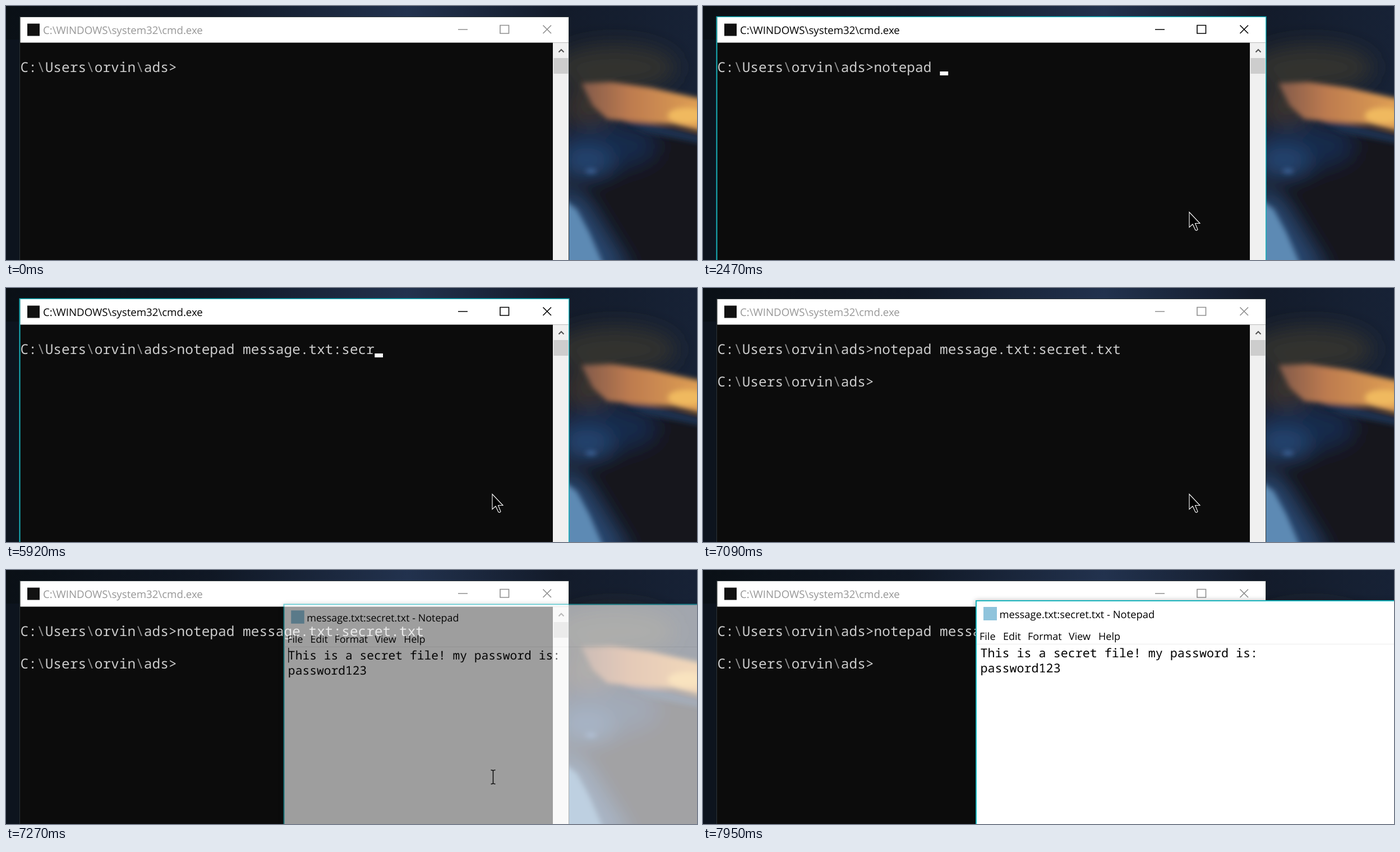
An HTML page for the animation above (8000 ms loop, 1232 by 454 pixels).

```html
<!DOCTYPE html>
<html lang="en">
<head>
<meta charset="utf-8">
<title>Terminal</title>
<style>
html, body { margin: 0; width: 100%; height: 100%; overflow: hidden; background: #0b1119; }
svg { display: block; }
text { white-space: pre; text-rendering: geometricPrecision; }
.ui { font-family: "Open Sans", "Noto Sans", sans-serif; }
.mono { font-family: "Noto Sans Mono", "DejaVu Sans Mono", monospace; }
.term { font-size: 24.47px; fill: #ccc; }
.slash { fill: #8c8c8c; font-weight: 200; }
.menu { font-size: 18px; }
.body { font-size: 21.7px; }
.frame { stroke: #2c3538; }
.title { fill: #969696; font-size: 18.66px; }
.buttons { stroke: #8e8e8e; stroke-width: 1.6; fill: none; }
.active .frame { stroke: #18b4bd; stroke-width: 2; }
.active .title { fill: #000; }
.active .buttons { stroke: #000; }
#paper { filter: drop-shadow(0 1px 5px rgba(0, 0, 0, .35)); }
</style>
</head>
<body>
<svg width="1232" height="454" viewBox="0 0 1232 454">
  <defs>
    <linearGradient id="sky">
      <stop offset="0" stop-color="#0a1016"/>
      <stop offset=".3" stop-color="#101825"/>
      <stop offset=".58" stop-color="#22324e"/>
      <stop offset=".8" stop-color="#131b2a"/>
      <stop offset="1" stop-color="#172236"/>
    </linearGradient>
    <linearGradient id="glow">
      <stop offset="0" stop-color="#80594a"/>
      <stop offset=".4" stop-color="#bd7b50"/>
      <stop offset="1" stop-color="#e0a052"/>
    </linearGradient>
    <filter id="soft" x="-50%" y="-50%" width="200%" height="200%"><feGaussianBlur stdDeviation="18"/></filter>
    <filter id="mild" x="-50%" y="-50%" width="200%" height="200%"><feGaussianBlur stdDeviation="5"/></filter>
  </defs>

  <g id="wallpaper">
    <rect width="1232" height="454" fill="url(#sky)"/>
    <rect y="60" width="25" height="394" fill="#0d141e"/>
    <g filter="url(#soft)">
      <rect x="990" y="210" width="300" height="300" fill="#12161f"/>
      <ellipse cx="1085" cy="110" rx="110" ry="42" fill="#32322f"/>
      <ellipse cx="1040" cy="180" rx="50" ry="34" fill="#37312e"/>
      <ellipse cx="1070" cy="250" rx="90" ry="38" fill="#182c4c"/>
      <ellipse cx="1035" cy="278" rx="48" ry="24" fill="#274673"/>
      <path d="M990 320L1030 350 1110 480H990Z" fill="#2b4a72"/>
    </g>
    <g filter="url(#mild)">
      <path d="M1026 138L1080 136 1150 146 1240 166V224L1190 212 1110 206 1072 202 1046 178Z" fill="url(#glow)"/>
      <ellipse cx="1214" cy="196" rx="34" ry="14" fill="#f0b95f"/>
      <path d="M1100 206L1150 210 1240 232V246L1140 226Z" fill="#1c3050"/>
      <ellipse cx="1043" cy="295" rx="10" ry="4" fill="#3c659b"/>
      <path d="M995 345L1018 364 1040 405 1066 465H995Z" fill="#5d8ab4"/>
    </g>
  </g>

  <g id="cmd">
    <rect class="frame" x="24.5" y="19.5" width="979" height="450" fill="#0c0c0c"/>
    <rect x="25.5" y="20" width="977.5" height="45.5" fill="#fff"/>
    <rect x="38" y="31.5" width="22" height="22" fill="#111"/>
    <text class="ui title" x="66" y="50">C:\WINDOWS\system32\cmd.exe</text>
    <path class="buttons" d="M806 42H823M881 34.5H896.5V49H881ZM957.5 34.5L972 49M972 34.5L957.5 49"/>
    <rect x="975" y="65.5" width="28" height="389" fill="#f0f0f0"/>
    <rect x="976.5" y="93" width="26" height="28" fill="#cdcdcd"/>
    <path d="M985.5 82.5L990 78 994.5 82.5" fill="none" stroke="#505050" stroke-width="2"/>
    <text class="mono term prompt" x="25.6" y="117.5"></text>
    <text class="mono term" id="typed" x="304.6" y="117.5"></text>
    <rect id="cursor" y="117" width="14.7" height="7" fill="#fff"/>
    <text class="mono term prompt" id="next" x="25.6" y="176.2"></text>
  </g>

  <g id="note">
    <rect id="paper" x="487" y="55" width="896" height="682" fill="#fff" stroke="#18b4bd" stroke-width="2"/>
    <rect x="500" y="66" width="24" height="24" fill="#8fc4dc"/>
    <text class="ui" x="528.5" y="86" font-size="18.35">message.txt:secret.txt - Notepad</text>
    <g class="ui menu">
      <text x="493" y="125">File</text>
      <text x="535" y="125">Edit</text>
      <text x="579" y="125">Format</text>
      <text x="652" y="125">View</text>
      <text x="705" y="125">Help</text>
    </g>
    <path d="M488 132.5H1382" stroke="#ececec"/>
    <text class="mono body" x="494.5" y="155.5">This is a secret file! my password is:</text>
    <text class="mono body" x="494.5" y="183">password123</text>
    <path id="caret" d="M495.5 134V161" stroke="#000" stroke-width="1.3"/>
  </g>

  <path id="arrow" d="M0 0V27L6 21.5 11 32Q13.5 33.5 15 31L10.5 20H19Z" fill="#000" stroke="#fff" stroke-width="1.1"/>
  <path id="beam" d="M-4-12.5Q0-12.5 0-10.5Q0-12.5 4-12.5M0-11V11M-4 12.5Q0 12.5 0 10.5Q0 12.5 4 12.5" fill="none" stroke-width="1.6"/>
</svg>
<script>
const LOOP = 8000, CHAR = 14.682;
const COMMAND = "notepad message.txt:secret.txt";

// time, typed characters, cursor visible
const typing = [
  [0, 0, 0], [1690, 1, 1], [1840, 1, 0], [2010, 2, 1], [2090, 3, 1], [2160, 4, 1],
  [2310, 5, 1], [2390, 6, 1], [2470, 8, 1], [2800, 9, 1], [2950, 10, 1], [3180, 19, 1],
  [3950, 20, 1], [4500, 20, 0], [5030, 20, 1], [5200, 21, 1], [5520, 22, 0], [5690, 23, 1],
  [5920, 24, 1], [6000, 25, 1], [6150, 26, 1], [6300, 27, 1], [6470, 28, 1], [6620, 29, 1],
  [6770, 30, 1], [7090, 30, 0]
];
// time, opacity, scale
const opening = [
  [0, 0, 1], [7180, .18, .956], [7270, .6, .981], [7330, .85, .991], [7410, .97, .998], [7490, 1, 1]
];
// time, x, y
const pointer = [
  [0, -99, -99], [120, 1004, 414], [200, 943, 393], [280, 893, 376], [360, 867, 368.5],
  [7180, 868.5, 370], [7720, 910, 352], [7800, 970, 326], [7870, 1025, 302], [7950, -99, -99]
];

const $ = id => document.getElementById(id);
const at = (rows, t) => rows.filter(row => row[0] <= t).pop();
const show = (id, on) => $(id).style.display = on ? "" : "none";

for (const el of document.querySelectorAll(".prompt"))
  el.innerHTML = "C:\\Users\\orvin\\ads>".replaceAll("\\", '<tspan class="slash">\\</tspan>');

function draw(now) {
  const t = now % LOOP;
  const [, count, blink] = at(typing, t);
  const [, alpha, scale] = at(opening, t);
  const [, x, y] = at(pointer, t);

  $("cmd").classList.toggle("active", t >= 1290 && t < 7090);
  $("typed").textContent = COMMAND.slice(0, count);
  $("cursor").setAttribute("x", 305 + count * CHAR);
  show("cursor", blink);
  show("next", t >= 7090);

  show("note", alpha);
  $("note").style.opacity = alpha;
  $("note").setAttribute("transform", `translate(935 396) scale(${scale}) translate(-935 -396)`);
  show("caret", t < 7720);

  show("arrow", t < 7180);
  show("beam", t >= 7180);
  for (const id of ["arrow", "beam"]) $(id).setAttribute("transform", `translate(${x} ${y})`);
  $("beam").setAttribute("stroke", t < 7270 ? "#ddd" : "#111");
  requestAnimationFrame(draw);
}
draw(performance.now());
</script>
</body>
</html>
```
